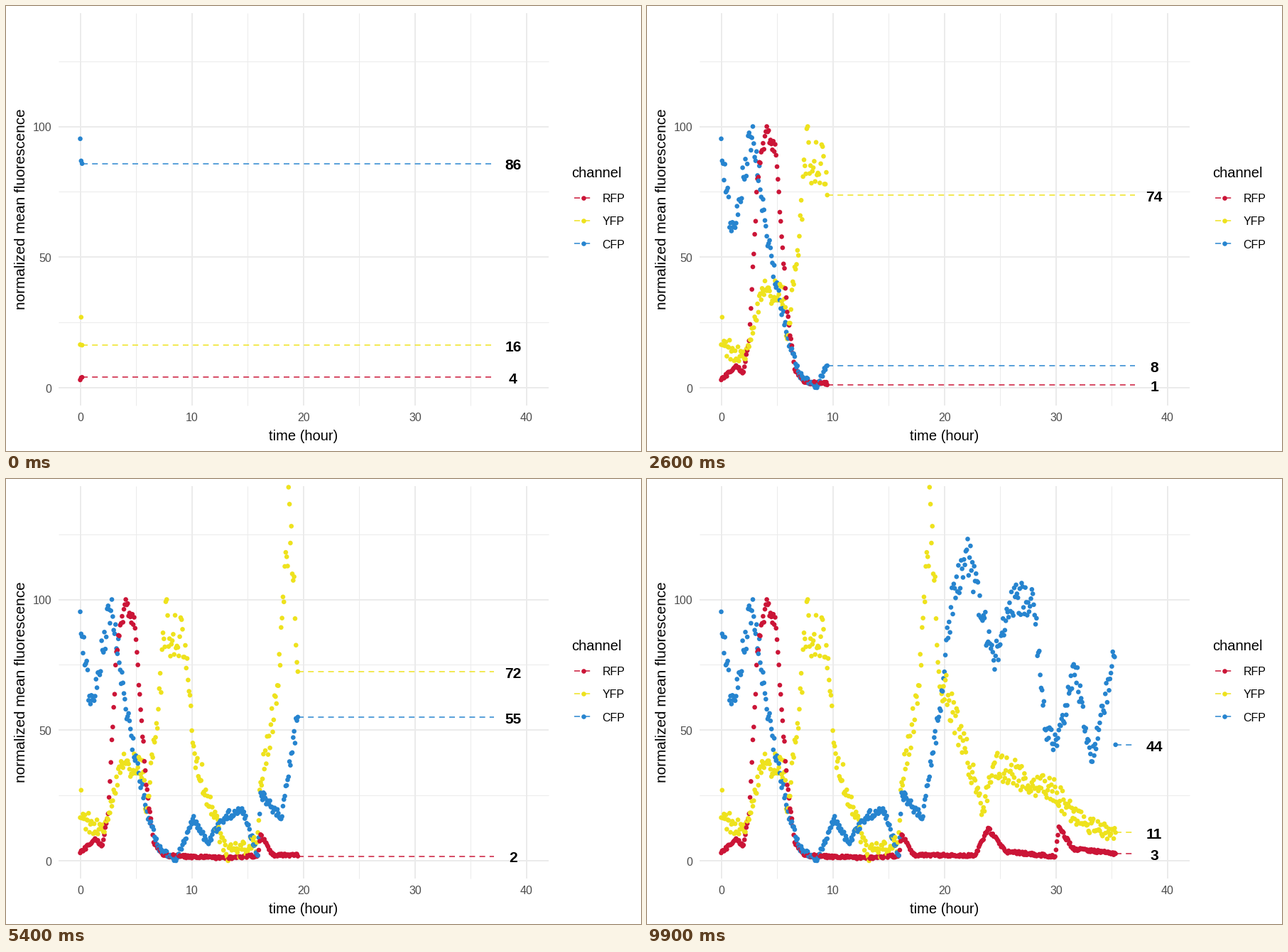
Recreate the animation shown at these times as a matplotlib script. Size 894 px wide and 626 px high, loop 10000 ms.

```python
import matplotlib.pyplot as plt
import numpy as np
from matplotlib.animation import FuncAnimation

W, H, DPI = 894, 626, 100
PT = 72 / DPI            # points per pixel
FRAMES = 100
LAST = 424               # last five-minute step
COLORS = ["#CB1537", "#EEE21D", "#2684CF"]
NAMES = ["RFP", "YFP", "CFP"]

plt.rcParams["font.family"] = "Liberation Sans"
plt.rcParams["lines.scale_dashes"] = False


def px(hour):
    return 104.5 + 15.7125 * hour


def py(value):
    return 537 - 3.675 * value


# (step, value) knots; the readings between them scatter around the curve
RED = [
    (0, 3), (15, 8), (24, 6), (30, 18), (39, 80), (49, 100), (59, 89),
    (71, 29), (79, 7), (90, 2), (157, 1), (191, 2), (194, 10), (207, 2.2),
    (273, 2), (287, 12.5), (293, 9.3), (306, 3.5), (359, 1.6), (363, 13),
    (378, 4.6), (424, 2.7),
]
YELLOW = [
    (0, 16.5), (1, 27), (2, 16.3), (26, 11), (45, 37), (68, 34), (71, 18.7),
    (84, 58), (93, 100), (95, 82), (110, 88.6), (123, 41), (157, 2.5),
    (190, 7), (194, 30), (213, 67), (225, 136.5), (234, 72.4), (260, 46),
    (281, 19), (293, 37), (361, 26), (380, 16), (424, 10.8),
]
BLUE = [
    (0, 95.3), (2, 85.8), (11, 60), (19, 72), (34, 100), (49, 58), (71, 20),
    (84, 5), (103, 0), (121, 16), (137, 7), (157, 17.2), (174, 20), (191, 2),
    (194, 26), (216, 16), (234, 55), (247, 97), (264, 119), (293, 76.7),
    (316, 101), (336, 98), (349, 50), (361, 44), (381, 74), (398, 38),
    (423, 78), (424, 44.4),
]


def readings(knots, base, rel, rng):
    steps, values = zip(*knots)
    curve = np.interp(np.arange(LAST + 1), steps, values)
    noise = rng.uniform(-1, 1, LAST + 1) * (base + rel * curve)
    noise[list(steps)] = 0
    return np.clip(curve + noise, 0, None)


rng = np.random.default_rng(7)
data = np.column_stack([
    readings(RED, 0.5, 0.03, rng),
    readings(YELLOW, 2.8, 0.08, rng),
    readings(BLUE, 0.8, 0.06, rng),
])
xs = px(np.arange(LAST + 1) / 12)
# interleaved by time so that later readings lie on top
dots = np.column_stack([np.repeat(xs, 3), py(data).ravel()])

fig = plt.figure(figsize=(W / DPI, H / DPI), dpi=DPI, facecolor="white")
ax = fig.add_axes([0, 0, 1, 1])
ax.set_xlim(0, W)
ax.set_ylim(H, 0)
ax.axis("off")


def text(x, y, s, size, color="black", **kw):
    return ax.text(x, y, s, fontsize=size * PT, color=color,
                   va="baseline", **kw)


def dashed(x0, x1, y, color):
    return ax.plot([x0, x1], [y, y], color=color, lw=1.5 * PT, zorder=2,
                   dashes=(8 * PT, 6.2 * PT), dash_capstyle="butt")[0]


def grid(hours, values, width):
    style = dict(color="#EBEBEB", lw=width * PT, zorder=1,
                 solid_capstyle="butt")
    for h in hours:
        ax.plot([px(h)] * 2, [10, 562], **style)
    for v in values:
        ax.plot([74, 764], [py(v)] * 2, **style)


grid(range(5, 40, 10), range(25, 150, 50), 1)
grid(range(0, 50, 10), range(0, 150, 50), 2)

for h in range(0, 50, 10):
    text(px(h), 584, str(h), 16, "#4D4D4D", ha="center")
for v in range(0, 150, 50):
    text(64.5, py(v) + 6.5, str(v), 16, "#4D4D4D", ha="right")
text(419, 611, "time (hour)", 20.2, ha="center")
text(27, 285.5, "normalized mean fluorescence", 20.8, ha="center",
     rotation=90, rotation_mode="anchor")

DOT = (6.6 * PT) ** 2
text(796, 241, "channel", 20.2, ha="left")
for i, (name, color) in enumerate(zip(NAMES, COLORS)):
    y = 269.5 + 32.3 * i
    dashed(800, 822.5, y, color)
    ax.scatter([812.5], [y], s=DOT, color=color, lw=0, zorder=3)
    text(839.5, y + 6.5, name, 16, ha="left")

points = ax.scatter([], [], s=DOT, lw=0, zorder=3)
points.set_facecolor(COLORS)
leads = [dashed(0, 0, 0, c) for c in COLORS]
labels = [text(714, 0, "", 21, ha="center", weight="bold", zorder=4)
          for _ in COLORS]


def update(frame):
    head = min(LAST, round(2 + 4.325 * frame - 0.0006 * frame ** 2))
    points.set_offsets(dots[:3 * (head + 1)])
    for lead, label, value in zip(leads, labels, data[head]):
        y = py(value)
        lead.set_data([xs[head], px(37.05)], [y, y])
        label.set_y(y + 8.8)
        label.set_text(f"{value:.0f}")
    return [points, *leads, *labels]


anim = FuncAnimation(fig, update, frames=FRAMES, interval=100,
                     repeat=True, repeat_delay=0)
plt.show()
```
